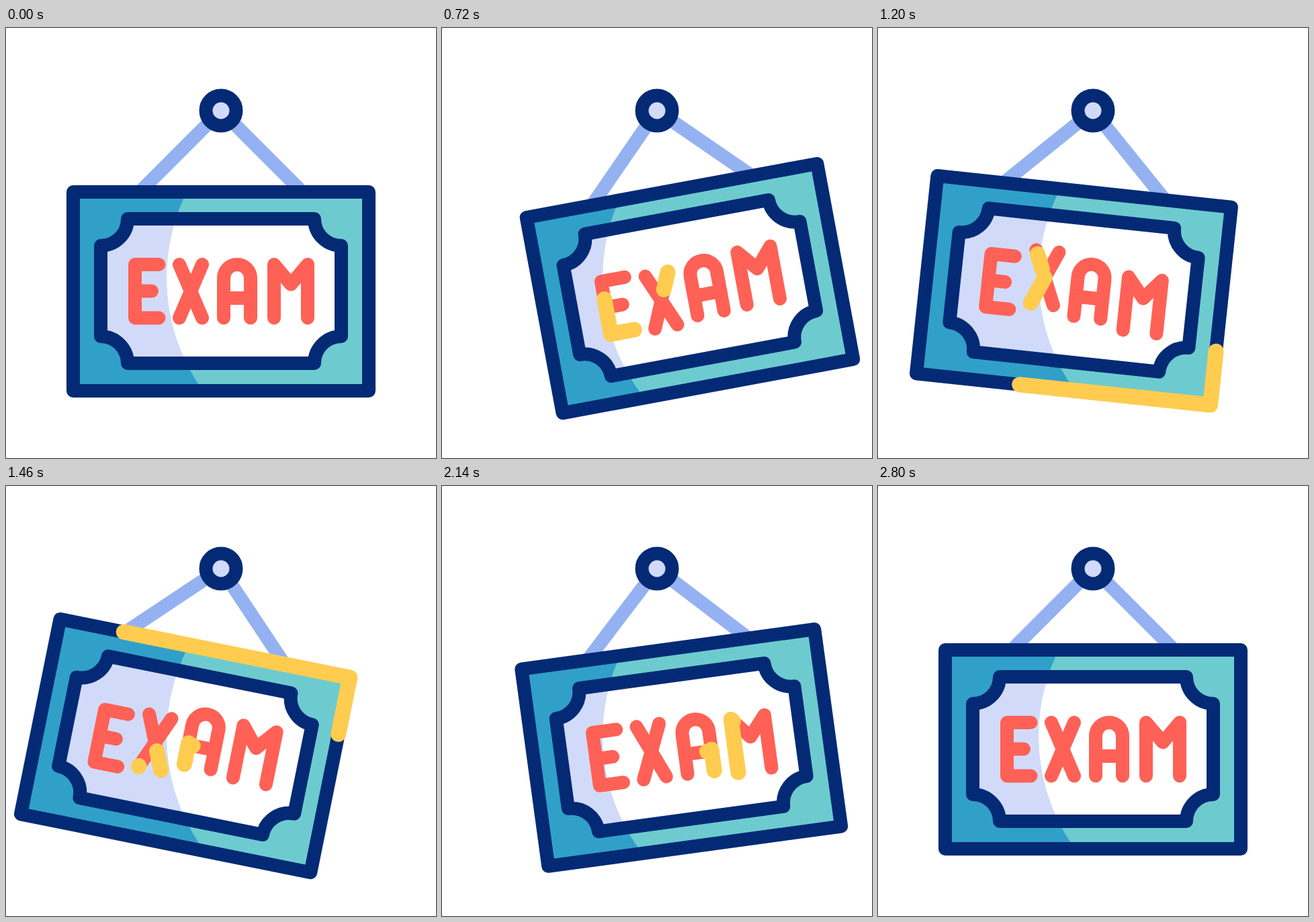
Recreate the animation shown at these times as an HTML page. Size 640 px wide and 640 px high, loop 3000 ms.

```html
<!DOCTYPE html>
<html lang="en">
<head>
<meta charset="utf-8">
<title>Exam sign</title>
<style>
  html, body { margin: 0; width: 100%; height: 100%; overflow: hidden; background: #fff; }
  svg { display: block; width: 100vw; height: 100vh; }
  .line { fill: none; stroke-width: 20; stroke-linecap: round; stroke-linejoin: round; }
  .navy { stroke: #042a75; }
  .rope { stroke: #94b1f2; }
  .red { stroke: #ff6156; }
  .glow { stroke: #ffcc50; stroke-width: 23; }
</style>
</head>
<body>
<svg viewBox="0 0 640 640">
  <defs>
    <clipPath id="light"><circle cx="527" cy="372" r="288"/></clipPath>
    <path id="board" d="M100 540H540V244H100Z"/>
    <path id="plaque" d="M181 284H459A40 40 0 0 0 499 324V459A40 40 0 0 0 459 499H181A40 40 0 0 0 141 459V324A40 40 0 0 0 181 284Z"/>
  </defs>
  <g class="swing">
    <path class="line rope" d="M203 240L320 123L437 240"/>
    <use href="#board" fill="#30a0c9"/>
    <use href="#plaque" fill="#d1dbf9"/>
  </g>
  <g clip-path="url(#light)">
    <g class="swing">
      <use href="#board" fill="#6dcbcf"/>
      <use href="#plaque" fill="#fff"/>
    </g>
  </g>
  <g class="swing">
    <use href="#board" class="line navy"/>
    <use href="#plaque" class="line navy"/>
    <g id="letters"></g>
    <g id="edge"></g>
  </g>
  <circle class="line navy" cx="320" cy="123" r="22.5" style="fill:#d1dbf9"/>
</svg>
<script>
const LOOP = 3000;

// Each stroke: path, then start and end times of its highlight's head and tail.
const letters = [
  [['M227.5 352H192V431.5H227.5', 200, 700, 500, 1000], ['M192 391.5H217']],
  [['M258 352L292 431.5', 1000, 1500, 1100, 1700], ['M292 352L258 431.5', 500, 1100, 900, 1500]],
  [['M324 431.5V372A20 20 0 0 1 364 372V431.5', 1300, 1900, 1700, 2300], ['M324 402H364', 1300, 1900, 1700, 2300]],
  [['M399 431.5V352L424 381.5L449 352V431.5', 1900, 2500, 2200, 2800]]
];
const edge = ['M100 540H540V244H100V540', 800, 1800, 1000, 2000];

const add = (parent, tag, attrs = {}) => {
  const el = document.createElementNS('http://www.w3.org/2000/svg', tag);
  for (const name in attrs) el.setAttribute(name, attrs[name]);
  return parent.appendChild(el);
};

const ease = (t, from, to) => {
  const u = Math.min(1, Math.max(0, (t - from) / (to - from)));
  return u * u * (3 - 2 * u);
};

// Eased value through equally spaced keys.
const track = (t, start, step, keys) => keys.slice(1).reduce(
  (v, key, i) => v + (key - keys[i]) * ease(t, start + i * step, start + (i + 1) * step), keys[0]);

const glows = [];
const addGlow = (parent, [d, ...times]) => {
  if (times.length) glows.push({ el: add(parent, 'path', { d, class: 'line glow', pathLength: 1 }), times });
};

const groups = letters.map(strokes => {
  const g = add(document.getElementById('letters'), 'g');
  strokes.forEach(([d]) => add(g, 'path', { d, class: 'line red' }));
  strokes.forEach(stroke => addGlow(g, stroke));
  return g;
});
addGlow(document.getElementById('edge'), edge);
const swings = document.querySelectorAll('.swing');

function draw(now) {
  const t = now % LOOP;
  const angle = track(t, 200, 600, [0, -11, 12, -9, 0]);
  swings.forEach(g => g.setAttribute('transform', `rotate(${angle} 320 123)`));
  groups.forEach((g, i) => {
    const y = track(t, 200 + 200 * i, 400, [0, 11.5, -14, 11.5, 0]);
    g.setAttribute('transform', `translate(0 ${y})`);
  });
  for (const { el, times: [h0, h1, t0, t1] } of glows) {
    const head = ease(t, h0, h1), tail = ease(t, t0, t1);
    el.style.display = head > tail ? '' : 'none';
    el.setAttribute('stroke-dasharray', `${head - tail} 3`);
    el.setAttribute('stroke-dashoffset', -tail);
  }
  requestAnimationFrame(draw);
}
draw(performance.now());
</script>
</body>
</html>
```
